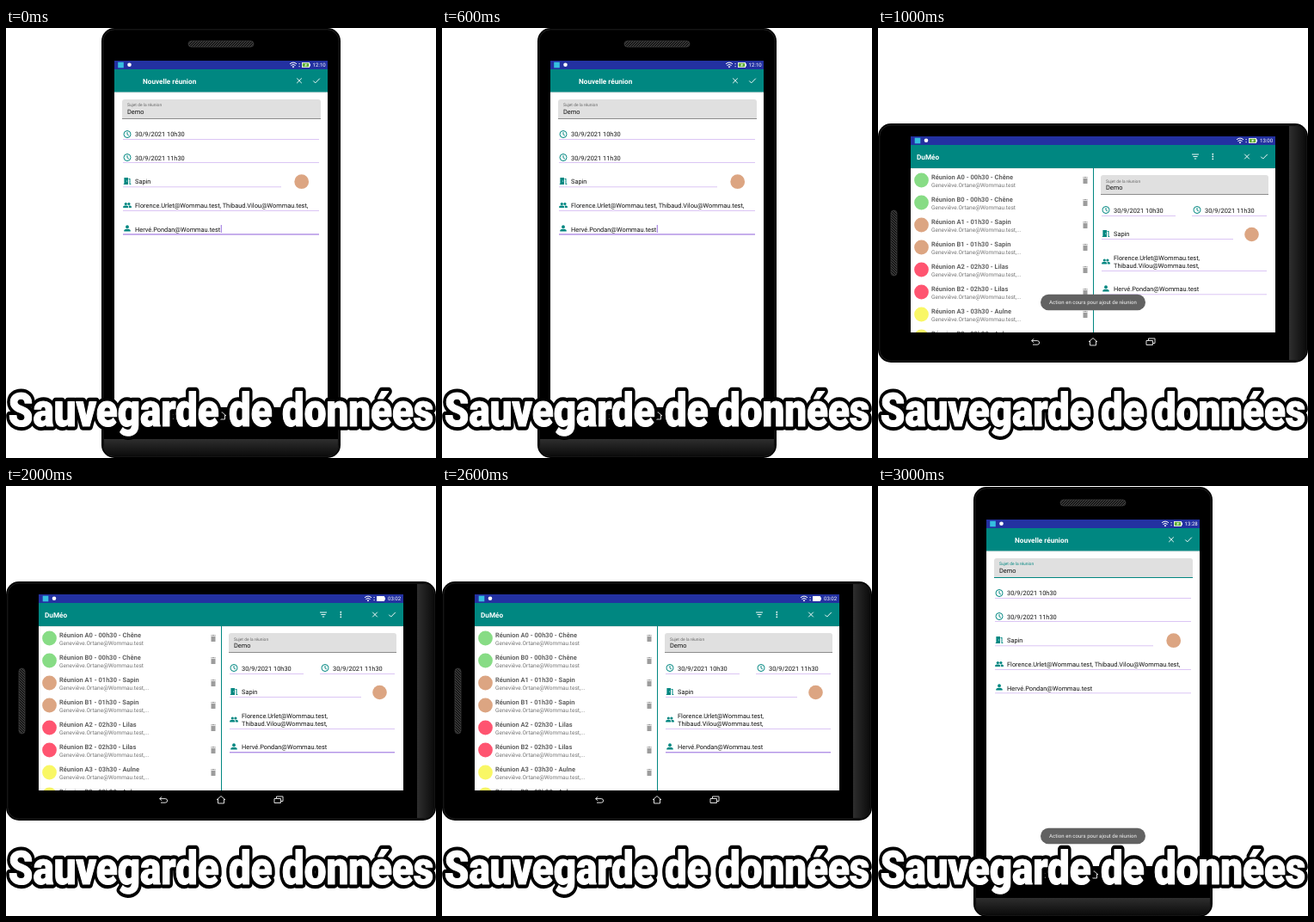
These frames come from a looping animation (500x500 px, 4000 ms). An HTML page:

```html
<!DOCTYPE html>
<html lang="fr">
<head>
<meta charset="utf-8">
<title>Sauvegarde de données</title>
<style>
html, body { margin: 0; width: 100%; height: 100%; overflow: hidden; background: #fff; }
svg {
  display: block; width: 500px; height: 500px;
  font-family: Roboto, "Noto Sans", sans-serif; text-rendering: geometricPrecision;
}
.scene { opacity: 0; animation: quarter 4s step-end infinite; }
.wide { opacity: 0; animation: half 4s step-end -3s infinite; }
.second { animation-delay: -3s; }
.third { animation-delay: -2s; }
.fourth { animation-delay: -1s; }
@keyframes quarter { 0% { opacity: 1; } 25%, 100% { opacity: 0; } }
@keyframes half { 0% { opacity: 1; } 50%, 100% { opacity: 0; } }
.bar { fill: #008781; }
.status { fill: #2331a1; }
.title { font-size: 8.2px; font-weight: 700; fill: #fff; }
.field { font-size: 7.4px; fill: #111; }
.label { font-size: 4.9px; fill: #666; }
.time { font-size: 6.1px; fill: #fff; }
.line { stroke: #d7bff3; stroke-width: .9; }
.focus { stroke: #a07ce0; stroke-width: 1.1; }
.teal { fill: #008781; }
.white { fill: none; stroke: #fff; stroke-width: .95; }
.head { font-size: 7.5px; font-weight: 700; fill: #636363; }
.mail { font-size: 6.55px; fill: #757575; }
.toast { font-size: 6.05px; letter-spacing: .04px; fill: #f4f4f4; }
.caption {
  font-size: 45.7px; font-weight: 900; text-anchor: middle;
  fill: #fff; stroke-linejoin: round;
}
.outline { stroke: #000; stroke-width: 8px; }
.face { stroke: #fff; stroke-width: 1px; }
</style>
</head>
<body>
<svg viewBox="0 0 500 500">
  <defs>
    <pattern id="mesh" width="3" height="3" patternUnits="userSpaceOnUse">
      <path d="M0 3L3 0" stroke="#4c4c4c" stroke-width=".9"/>
    </pattern>
    <linearGradient id="shade" x2="0" y2="1">
      <stop stop-color="#000" stop-opacity=".12"/>
      <stop offset="1" stop-color="#000" stop-opacity="0"/>
    </linearGradient>
    <linearGradient id="chin" x2="0" y2="1">
      <stop stop-color="#2e2e2e"/>
      <stop offset="1" stop-color="#0c0c0c"/>
    </linearGradient>
    <clipPath id="list"><path d="M38 163H250V354H38Z"/></clipPath>

    <g id="device">
      <rect x="111" width="278" height="500" rx="15"/>
      <rect x="112.8" y="1.8" width="274.4" height="496.4" rx="13.5" fill="none" stroke="#1f1f1f"/>
      <path fill="url(#chin)" d="M114 478H386V486Q386 497.5 374.5 497.5H125.5Q114 497.5 114 486Z"/>
      <rect x="212" y="15" width="76" height="7" rx="3.5" fill="#161616"/>
      <rect x="212" y="15" width="76" height="7" rx="3.5" fill="url(#mesh)" stroke="#3a3a3a" stroke-width=".8"/>
    </g>

    <!-- icons are centred on 0,0 -->
    <g id="clock" fill="none" stroke="#008781" stroke-width="1">
      <circle r="4"/><path d="M0-2.4V.3L1.9 1.5"/>
    </g>
    <g id="door" class="teal">
      <path d="M-3.6-4H1V4H-4.2V3H-3.6Z"/>
      <path d="M1.6-3H3.5V3H4.3V4H2.5V-2H1.6Z"/>
      <circle cx="-.4" r=".6" fill="#fff"/>
    </g>
    <g id="person" class="teal">
      <circle cy="-1.8" r="1.9"/>
      <path d="M-3.7 3.5V2.4C-3.7 .3 3.7 .3 3.7 2.4V3.5Z"/>
    </g>
    <g id="group" class="teal">
      <circle cx="-1.7" cy="-1.5" r="1.6"/><circle cx="1.9" cy="-1.5" r="1.6"/>
      <path d="M-4.8 3V1.8C-4.8 .1 1.2 .1 1.2 1.8V3Z"/>
      <path d="M2 3V1.8Q2 1 1.4 .5C3.2 .3 4.9 .8 4.9 1.8V3Z"/>
    </g>
    <path id="cross" class="white" d="M-2.8-2.8L2.8 2.8M2.8-2.8L-2.8 2.8"/>
    <path id="check" class="white" d="M-3.7 .2L-1.3 2.6L3.8-2.6"/>
    <path id="filter" class="white" d="M-4-2.5H4M-2.6 0H2.6M-1.2 2.5H1.2"/>
    <g id="dots" fill="#fff"><circle cy="-2.8" r=".9"/><circle r=".9"/><circle cy="2.8" r=".9"/></g>
    <g id="bin" fill="#9c9c9c">
      <path d="M-3-3.5H-1.4L-.9-4H.9L1.4-3.5H3V-2.7H-3Z"/>
      <path d="M-2.5-2.1H2.5V3.4Q2.5 4 1.9 4H-1.9Q-2.5 4-2.5 3.4Z"/>
    </g>
    <g id="marks">
      <rect x="-3.3" y="-3.3" width="6.6" height="6.6" fill="#35bfe0"/>
      <circle cx="10" cy="-.3" r="2.3" fill="#fff"/>
    </g>
    <g id="wifi">
      <path fill="none" stroke="#fff" d="M-4-1.2Q0-4.6 4-1.2M-2.6 .5Q0-1.7 2.6 .5"/>
      <path d="M-1.4 1.8Q0 .6 1.4 1.8L0 3.5Z" fill="#fff"/>
      <path d="M6.6-2H7.6V-.8H6.6ZM6.6 1H7.6V2.2H6.6Z" fill="#fff"/>
    </g>
    <path id="battery" d="M-5-3H4V-1.4H5V1.4H4V3H-5Z" fill="#fff"/>
    <g id="charge">
      <use href="#battery"/>
      <path d="M-4.2-2.2H3.2V2.2H-4.2Z" fill="#5fae35"/>
      <path d="M.4-2L-2 .4H-.4L-1 2L1.4-.4H-.2Z" fill="#fff"/>
    </g>
    <path id="back" fill="none" stroke="#ddd" d="M-1.8-3.6L-4.4-1.4L-1.8 .8M-4.4-1.4H2.2Q4.6-1.4 4.6 1Q4.6 3.2 2.2 3.2H-3"/>
    <path id="home" fill="none" stroke="#ddd" d="M-5 0L0-4.4L5 0M-3.5-1V4H3.5V-1"/>
    <path id="recent" fill="none" stroke="#ddd" d="M-5-1.5H2.5V3.5H-5ZM-2.5-1.5V-4H5V1.5H2.5"/>
    <g id="pill">
      <rect x="189" width="122" height="18.5" rx="9.2" fill="#626262"/>
      <text class="toast" x="250" y="11.4" text-anchor="middle">Action en cours pour ajout de réunion</text>
    </g>
    <text id="caption" class="caption" transform="translate(250 463) scale(1 1.18)">Sauvegarde de données</text>

    <g id="portrait">
      <use href="#device"/>
      <path class="status" d="M126 38H374V48H126Z"/>
      <path fill="#fff" d="M126 74H374V441H126Z"/>
      <path class="bar" d="M126 48H374V74.5H126Z"/>
      <rect x="126" y="74.5" width="248" height="1.5" fill="url(#shade)"/>
      <use href="#marks" x="133.5" y="43"/>
      <use href="#wifi" x="334" y="43"/>
      <use href="#charge" x="349" y="43"/>
      <text class="title" x="159" y="64.5">Nouvelle réunion</text>
      <use href="#cross" x="341" y="61.3"/>
      <use href="#check" x="361" y="61.3"/>
      <path fill="#e0e0e0" d="M135 106V86Q135 83 138 83H363Q366 83 366 86V106Z"/>
      <use href="#clock" x="141" y="123.5"/>
      <use href="#clock" x="141" y="150.5"/>
      <use href="#door" x="141" y="178"/>
      <use href="#group" x="141" y="206"/>
      <use href="#person" x="141" y="233"/>
      <path class="line" d="M136 129.5H364M136 156.5H364M136 184.8H320M136 212.5H364M136 239.8H364"/>
      <g class="field">
        <text x="141" y="100">Demo</text>
        <text x="150" y="126.3">30/9/2021 10h30</text>
        <text x="150" y="153.5">30/9/2021 11h30</text>
        <text x="150" y="181.3">Sapin</text>
        <text x="150" y="209">Florence.Urlet@Wommau.test, Thibaud.Vilou@Wommau.test,</text>
        <text x="150" y="236.5">Hervé.Pondan@Wommau.test</text>
      </g>
      <circle cx="343.7" cy="178.7" r="8.4" fill="#dca582"/>
      <use href="#back" x="196" y="451"/>
      <use href="#home" x="251" y="451"/>
      <use href="#recent" x="306" y="451"/>
    </g>
  </defs>

  <rect width="500" height="500" fill="#fff"/>

  <g class="scene">
    <use href="#portrait"/>
    <text class="time" x="356.6" y="45.3">12:10</text>
    <text class="label" x="141" y="91.3">Sujet de la réunion</text>
    <path stroke="#8c8c8c" d="M135 105.5H366"/>
    <path class="focus" d="M136 240H364M250.3 229V238"/>
  </g>

  <g class="scene fourth">
    <use href="#portrait" y="1"/>
    <text class="time" x="356.6" y="46.3">13:28</text>
    <text class="label" x="141" y="92.3" style="fill:#008781">Sujet de la réunion</text>
    <rect class="teal" x="135" y="106" width="231" height="1"/>
    <use href="#pill" y="397.7"/>
  </g>

  <g class="wide">
    <use href="#device" transform="rotate(-90 250 250)"/>
    <path class="status" d="M38 126H462V136H38Z"/>
    <path class="bar" d="M38 136H462V163H38Z"/>
    <path fill="#fff" d="M38 163H462V354H38Z"/>
    <rect x="38" y="163" width="424" height="1.5" fill="url(#shade)"/>
    <use href="#marks" x="46" y="131"/>
    <use href="#wifi" x="421" y="131"/>
    <text class="title" x="45" y="153">DuMéo</text>
    <use href="#filter" x="369" y="149.5"/>
    <use href="#dots" x="389.3" y="149.5"/>
    <use href="#cross" x="429" y="149.5"/>
    <use href="#check" x="449" y="149.5"/>
    <g id="rows" clip-path="url(#list)"></g>
    <path class="bar" d="M250 163H251V354H250Z"/>
    <path fill="#e0e0e0" d="M259 194V174Q259 171 262 171H451Q454 171 454 174V194Z"/>
    <path stroke="#8c8c8c" d="M259 193.5H454"/>
    <text class="label" x="265" y="179.5">Sujet de la réunion</text>
    <use href="#clock" x="265" y="211.5"/>
    <use href="#clock" x="371" y="211.5"/>
    <use href="#door" x="265" y="239"/>
    <use href="#group" x="265" y="271.5"/>
    <use href="#person" x="265" y="303"/>
    <path class="line" d="M260 218.5H346M365 218.5H452M260 245.5H413M260 282.5H452M260 309.8H452"/>
    <g class="field">
      <text x="265" y="188">Demo</text>
      <text x="274" y="214.7">30/9/2021 10h30</text>
      <text x="380" y="214.7">30/9/2021 11h30</text>
      <text x="274" y="242.3">Sapin</text>
      <text x="274" y="270.3">Florence.Urlet@Wommau.test,</text>
      <text x="274" y="279">Thibaud.Vilou@Wommau.test,</text>
      <text x="274" y="306.3">Hervé.Pondan@Wommau.test</text>
    </g>
    <circle cx="434.5" cy="240" r="8.3" fill="#dca582"/>
    <use href="#back" x="183" y="365"/>
    <use href="#home" x="250" y="365"/>
    <use href="#recent" x="317" y="365"/>
  </g>

  <g class="scene second">
    <use href="#charge" x="436" y="131"/>
    <text class="time" x="444" y="133.3">13:00</text>
    <use href="#pill" y="309.7"/>
  </g>

  <g class="scene third">
    <use href="#battery" x="436" y="131"/>
    <text class="time" x="444" y="133.3">03:02</text>
    <path class="focus" d="M260 309.8H452"/>
  </g>

  <use href="#caption" class="outline"/>
  <use href="#caption" class="face"/>
</svg>
<script>
const rooms = [["Chêne", "#87dc85"], ["Sapin", "#dca582"], ["Lilas", "#ff5470"], ["Aulne", "#f9f765"]];
let html = "";
for (let i = 0; i < 8; i++) {
  const n = i >> 1, y = 177 + i * 26;
  const [room, color] = rooms[n];
  html += `<circle cx="50.5" cy="${y}" r="8.4" fill="${color}"/>
    <text class="head" x="62" y="${y - 1.3}">Réunion ${"AB"[i % 2]}${n} - 0${n}h30 - ${room}</text>
    <text class="mail" x="62" y="${y + 7.6}">Geneviève.Ortane@Wommau.test${n ? ",..." : ""}</text>
    <use href="#bin" x="241" y="${y}"/>`;
}
document.getElementById("rows").innerHTML = html;
</script>
</body>
</html>
```
